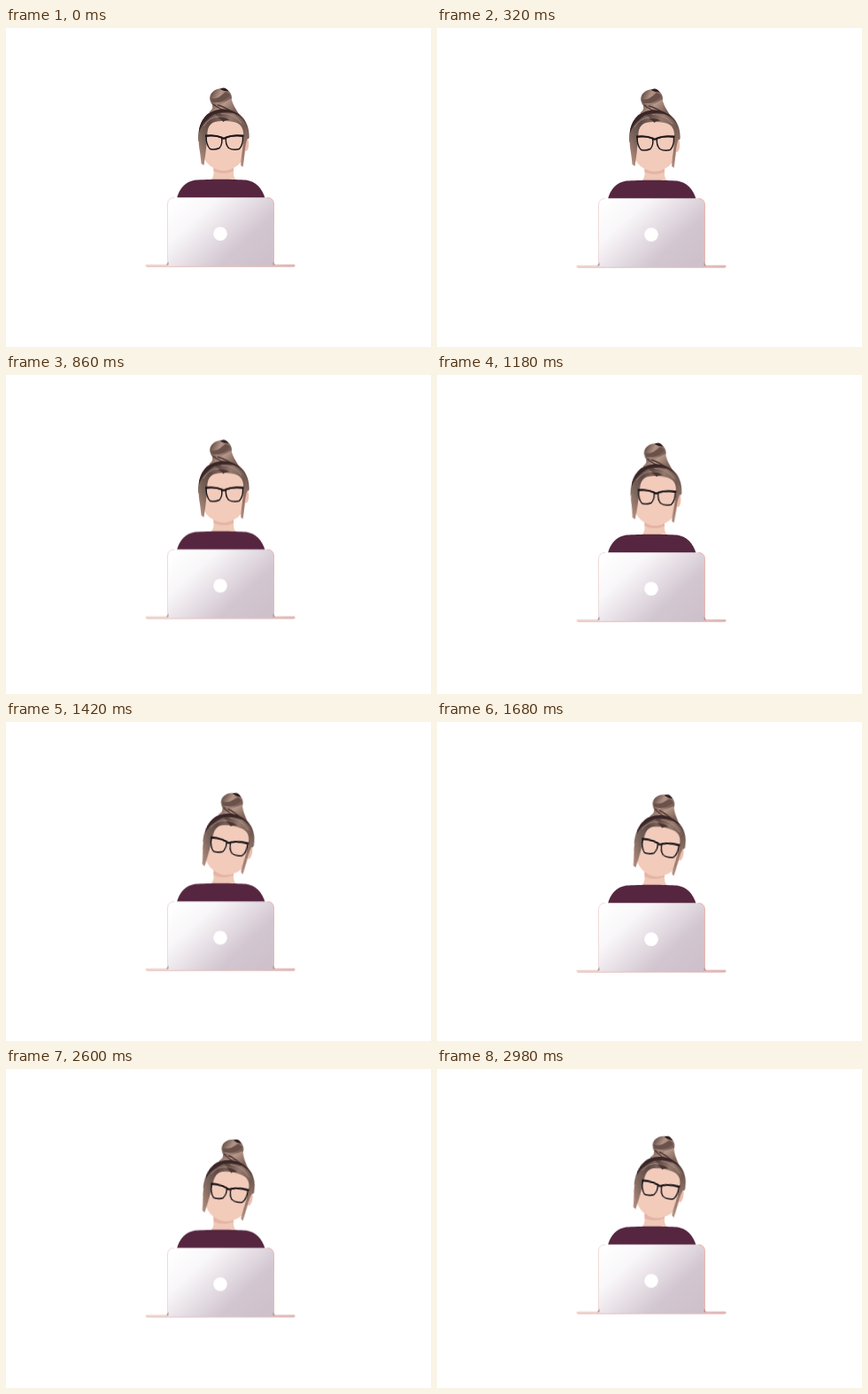
These frames come from a looping animation (480x360 px, 3 s). An HTML page:

```html
<!DOCTYPE html>
<html lang="en">
<head>
<meta charset="utf-8">
<title>Working at a laptop</title>
<style>
html, body { margin: 0; width: 100%; height: 100%; overflow: hidden; background: #fff; }
svg { display: block; width: 100vw; height: 100vh; }

#scene { animation: float 3s infinite; }
#head { transform-origin: 245px 158px; animation: tilt 3s infinite; }

/* half a sine wave down, then a quarter back up before the loop restarts */
@keyframes float {
  0% { transform: translateY(0); animation-timing-function: cubic-bezier(.365, 0, .635, 1); }
  65.333% { transform: translateY(13.6px); animation-timing-function: cubic-bezier(.362, 0, .673, .488); }
  100% { transform: translateY(6.6px); }
}
@keyframes tilt {
  0%, 33.333% { transform: rotate(0deg); animation-timing-function: ease-in-out; }
  50%, 100% { transform: rotate(9.7deg); }
}
</style>
</head>
<body>
<svg viewBox="0 0 480 360">
  <defs>
    <linearGradient id="lid" x1="0" y1=".15" x2="1" y2=".85">
      <stop offset="0" stop-color="#fff"/>
      <stop offset=".25" stop-color="#f9f7f9"/>
      <stop offset=".5" stop-color="#e5dde4"/>
      <stop offset=".72" stop-color="#d2c6d0"/>
      <stop offset="1" stop-color="#cec1cc"/>
    </linearGradient>
    <linearGradient id="base">
      <stop offset="0" stop-color="#f2d6cf"/>
      <stop offset=".5" stop-color="#eed9d8"/>
      <stop offset="1" stop-color="#dfb4b4"/>
    </linearGradient>
    <linearGradient id="cap" x1="0" y1=".2" x2="1" y2=".6">
      <stop offset="0" stop-color="#3a2426"/>
      <stop offset=".5" stop-color="#4a3532"/>
      <stop offset="1" stop-color="#6b534b"/>
    </linearGradient>
    <linearGradient id="hairLeft" x1=".9" y1="0" x2=".1" y2="1">
      <stop offset="0" stop-color="#8b7468"/>
      <stop offset=".35" stop-color="#5d4843"/>
      <stop offset=".65" stop-color="#7b655b"/>
      <stop offset="1" stop-color="#b98f80"/>
    </linearGradient>
    <linearGradient id="hairRight" x1="0" y1="0" x2=".8" y2="1">
      <stop offset="0" stop-color="#4a3432"/>
      <stop offset=".3" stop-color="#94796c"/>
      <stop offset=".6" stop-color="#735a51"/>
      <stop offset="1" stop-color="#b18c7d"/>
    </linearGradient>
    <linearGradient id="bun" x1="0" y1=".2" x2="1" y2=".7">
      <stop offset="0" stop-color="#5a443f"/>
      <stop offset=".4" stop-color="#b39588"/>
      <stop offset="1" stop-color="#5e4740"/>
    </linearGradient>
    <linearGradient id="twist" x1="0" y1="0" x2="1" y2=".5">
      <stop offset="0" stop-color="#4b3634"/>
      <stop offset=".55" stop-color="#b7988a"/>
      <stop offset="1" stop-color="#7b6157"/>
    </linearGradient>
  </defs>

  <g id="scene">
    <path fill="#f0c8b8" d="M234.500 152H257V164Q257 168.500 260 171.500H231Q234.500 168.500 234.500 164Z"/>
    <path fill="#e4b4a4" d="M234.500 155H257V161.500Q246 166.500 234.500 161.500Z"/>
    <path fill="#562640" d="M192.800 193C195.500 181 203 173.300 214 171.600C226 170.300 260 170.300 271 171.600C282 173.300 289.500 181 292.800 193Z"/>

    <g id="head">
      <path fill="url(#cap)" d="M217.500 128C215.500 105 228 91 245 91C262 91 275.500 104 274.500 124L269 130L224 130Z"/>
      <ellipse cx="271" cy="131" rx="3.200" ry="8" fill="#edbeae"/>
      <ellipse cx="220.500" cy="131" rx="2.800" ry="8" fill="#edbeae"/>
      <path fill="#f2cbbb" d="M223 113Q230 102 247 103Q266 103 270 115V140C270 151 257 161 246 161C236 161 223 153 223 142Z"/>

      <path fill="url(#bun)" d="M232 85C227 76 234 68.500 244 68C253 68 257 77 254 84L250 93H234Q236 89 232 85Z"/>
      <path fill="#2f1c1e" d="M241.500 69Q247 65 251.500 71.500Q246 71.500 241.500 69Z"/>
      <path fill="#6a524a" d="M231 79Q238 82 248 72Q252 73 253 76Q245 86 232.500 84Z"/>
      <path fill="url(#twist)" d="M231.500 84Q243 88 254.500 79Q255 85 263 97Q246 98 229.500 95Q236 90 231.500 84Z"/>
      <path fill="none" stroke="#4c3733" stroke-width="1.300" d="M234 86Q241 92 253 95M239 87Q247 89 258 96"/>

      <path fill="url(#hairLeft)" d="M246 105C234 104.500 229 108 227.500 117C226.500 132 225.500 143 223.500 155L220.500 153C220 143 217.500 134 217.500 122C218.500 107 229 96 244 95Q249 99 246 105Z"/>
      <path fill="url(#hairRight)" d="M236 97Q248 91 260 98C270 104 274.500 113 273.500 123C269 132 270 146 267.500 157L265.200 155C265.500 142 269 132 268 118C267 108 260 105 247 105Q240 101 236 97Z"/>
      <path fill="#3a2527" d="M217.800 118C219 101 231 91.500 246 91.500Q257 92 264 98.500Q254 94 242 95.500C231 97 222 107 217.800 118Z"/>
      <path fill="none" stroke="#b79b8d" stroke-width=".7" d="M243 96.500Q256 96 266 107M223 111Q230 100 240 100"/>
      <path fill="#4a3432" d="M239 102Q243 102.500 245.500 106Q248 103 253 104Q246 99 239 102Z"/>

      <g fill="none" stroke="#191519" stroke-linejoin="round">
        <path stroke-width="1.400" d="M226 122Q236 120.500 243.500 123.500Q245 131 241 135.500Q236 138 230.500 136.500Q226 132 226 122ZM248.500 123.500Q256 120.500 267.500 122Q268 132 263.500 136.500Q257 138.500 251.500 135.500Q247.500 131 248.500 123.500Z"/>
        <path stroke-width="2.100" d="M225 121.600Q236 120.200 243.500 123.600Q246 125.500 248.500 123.600Q256 120.200 268.600 121.600"/>
      </g>
    </g>

    <rect x="157.500" y="266.800" width="169" height="2.800" rx="1.400" fill="url(#base)"/>
    <path fill="url(#lid)" d="M182.500 269V199Q182.500 191.200 190 191.200H295Q302.500 191.200 302.500 199V269Z"/>
    <path fill="none" stroke="#ead2d0" stroke-width=".8" d="M182.500 267V199Q182.500 191.500 190 191.500"/>
    <path fill="none" stroke="#efb0a5" stroke-width=".9" d="M295 191.500Q302.500 191.500 302.500 199V267"/>
    <path fill="#b59197" d="M181 267.500L183.500 263.500V267.500ZM304 267.500L301.500 263.500V267.500Z"/>
    <path stroke="#dfb9b5" stroke-width=".8" d="M159 269.300H325"/>
    <circle cx="242" cy="232.300" r="7.800" fill="#fff"/>
  </g>
</svg>
</body>
</html>
```
